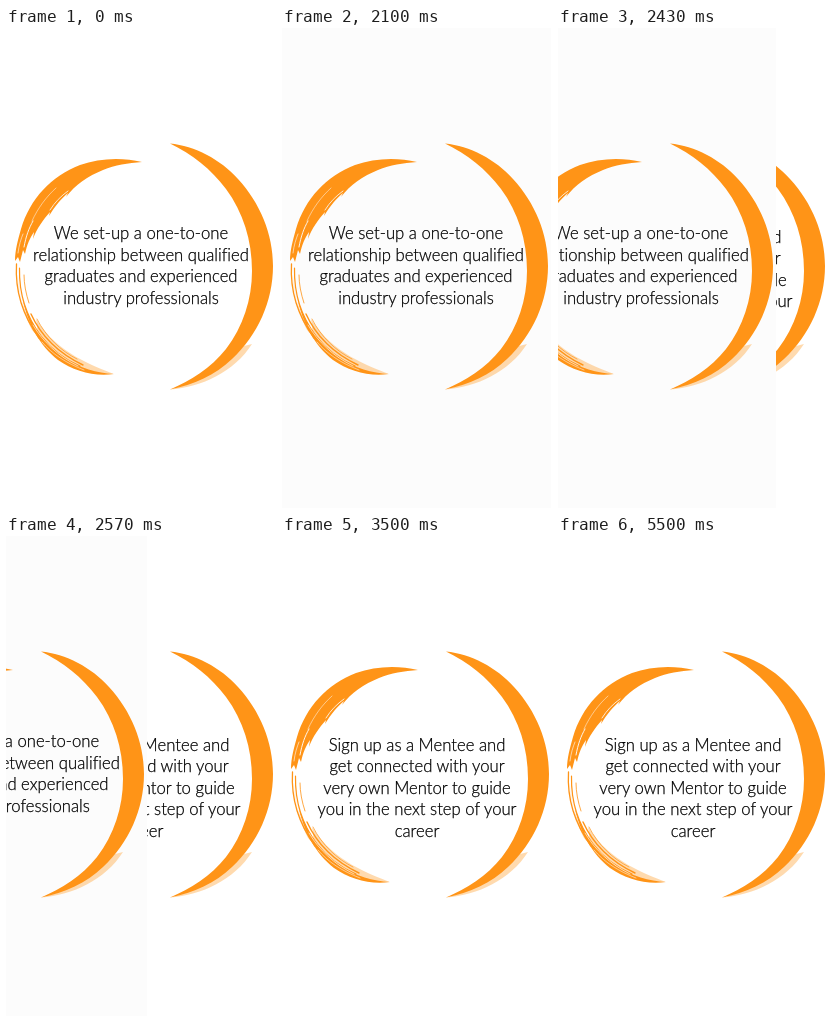
An HTML page that plays this animation: 270x480 px, repeating every 8 s.

```html
<!DOCTYPE html>
<html lang="en">
<head>
<meta charset="utf-8">
<title>Mentoring</title>
<style>
  html, body { margin: 0; width: 100%; height: 100%; overflow: hidden; background: #fff; }
  .page { position: absolute; left: 0; top: 0; width: 270px; height: 480px; background: #fff; }
  svg { display: block; }
  text {
    font: 300 16.7px Lato, "Open Sans", sans-serif;
    font-variant-ligatures: none;
    text-anchor: middle;
    fill: #000;
    stroke: #000;
    stroke-width: .25px;
  }
  .band { fill: #ff9417; }
  .soft { fill: #ff9417; opacity: .35; }
  .hair { fill: none; stroke: #ff9417; stroke-linecap: round; }
  .gap { fill: none; stroke: #fff; stroke-linecap: round; }
  .out .gap { stroke: #fcfcfc; }
</style>
</head>
<body>
<div class="page" id="next"></div>
<div class="page out" id="first"></div>
<script>
const LOOP = 8000, SLIDE = 2096, STEP = 66.6;
const shifts = [1, 3, 8, 17, 31, 52, 84, 129, 179, 225, 252, 266, 270];

const path = (cls, d, w) => `<path class="${cls}" d="${d}"${w ? ` stroke-width="${w}"` : ''}/>`;

const ring = [
  // right crescent
  path('soft', 'M164 361.5C196 359 228 344 246 316L238 318C217 342 192 355 164 361.5Z'),
  path('band', 'M164 115.5C189 118 214 131 232 151C254 175 267 206 267 238C267 273 252 307 226 331C209 347 188 357 164 361.5C184 353 205 340 220 321C237 299 246 271 246 243C246 212 237 184 220 161C205 141 186 126 164 115.5Z'),
  // upper left stroke
  path('band', 'M136 134C116 129 93 130 74 137C45 148 24 171 15 201C12 212 9 222 9 233L12 229L14 234L17 222L19 226C21 216 24 210 28 204L27 211C31 200 37 192 44 184L43 188C49 178 55 171 62 165L60 169C69 157 82 148 97 142C109 137 122 135 136 134Z'),
  path('gap', 'M26 193C32 180 40 169 50 160', .5),
  path('gap', 'M18 219C20 208 23 200 27 193', .9),
  path('gap', 'M44 182C49 174 55 168 62 163', .8),
  path('gap', 'M12 225C13 217 15 211 17 206', .6),
  // lower left stroke
  path('soft', 'M12 250C14 285 36 325 70 340C82 344 95 346 108 346C88 338 52 326 30 291C36 322 18 300 12 250Z'),
  path('band', 'M16 268C22 293 38 316 58 330C74 340 91 345 108 346C88 349 68 343 52 332C34 318 21 295 16 268Z'),
  path('hair', 'M10.5 236C9 262 17 288 33 310', 1.3),
  path('hair', 'M13.5 240C13 263 19 287 35 308C45 321 58 331 74 338', 1.2),
  path('hair', 'M18 247C18 256 20 266 23 275', .8),
  path('hair', 'M25 286C35 308 52 325 77 337', 1.4),
  path('hair', 'M31 291C40 309 55 323 71 331', .7),
  path('gap', 'M27 297C37 314 52 328 72 338', .6),
  path('gap', 'M36 314C46 326 60 335 78 342', .5)
].join('');

function fill(id, y, lines) {
  const rows = lines.map((s, i) => `<text x="135" y="${y + i * 21.6}">${s}</text>`).join('');
  const el = document.getElementById(id);
  el.innerHTML = `<svg width="270" height="480" viewBox="0 0 270 480">${ring}${rows}</svg>`;
  return el;
}

fill('next', 214.6, [
  'Sign up as a Mentee and',
  'get connected with your',
  'very own Mentor to guide',
  'you in the next step of your',
  'career'
]);
const first = fill('first', 211, [
  'We set-up a one-to-one',
  'relationship between qualified',
  'graduates and experienced',
  'industry professionals'
]);

const key = (ms, x, bg) => ({
  offset: ms / LOOP, transform: `translateX(${-x}px)`, backgroundColor: bg, easing: 'step-end'
});
const frames = [
  key(0, 0, '#fff'),
  ...shifts.map((x, i) => key(SLIDE + i * STEP, x, '#fcfcfc')),
  key(LOOP, 270, '#fcfcfc')
];
first.animate(frames, { duration: LOOP, iterations: Infinity }).startTime = 0;
</script>
</body>
</html>
```
